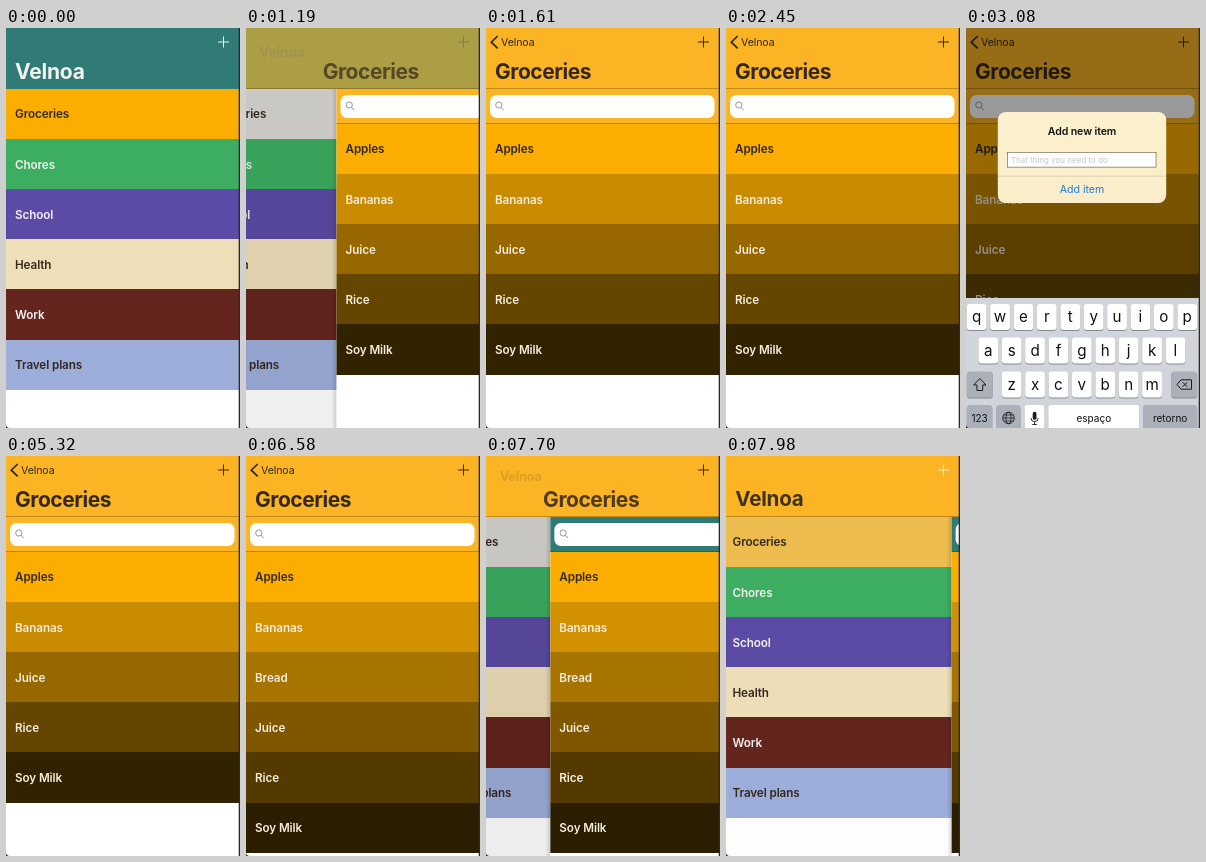
These frames come from a looping animation (234 px wide and 400 px high, 8 s). An HTML page with a canvas:

```html
<!DOCTYPE html>
<html lang="en">
<head>
<meta charset="utf-8">
<title>Velnoa</title>
<style>
html, body { margin: 0; width: 100%; height: 100%; overflow: hidden; background: #fff; }
canvas { display: block; width: 234px; height: 400px; }
</style>
</head>
<body>
<canvas id="stage"></canvas>
<script>
const W = 234, H = 400, LOOP = 8000, ROW = 50.1, BAR = 61;
const APP = 'Velnoa';
const TEAL = [48, 123, 118], GOLD = [250, 180, 36], ORANGE = [251, 174, 0];
const DARK = [52, 40, 28], WHITE = [242, 242, 240], GRAY = [214, 213, 209];
const FONT = 'Inter, "Liberation Sans", sans-serif';
const PUSH = 1050, POP = 7631, ADDED = 5390;
const TYPED = [3360, 3570, 3710, 3850, 4060];

const lists = [
  ['Groceries', ORANGE, DARK],
  ['Chores', [61, 174, 97], WHITE],
  ['School', [91, 75, 166], WHITE],
  ['Health', [238, 223, 185], DARK],
  ['Work', [100, 37, 30], WHITE],
  ['Travel plans', [157, 174, 219], DARK]
];

const canvas = document.getElementById('stage');
const c = canvas.getContext('2d');
const dpr = window.devicePixelRatio || 1;
canvas.width = W * dpr;
canvas.height = H * dpr;

const clamp = v => Math.max(0, Math.min(1, v));
const smooth = v => { v = clamp(v); return v * v * (3 - 2 * v); };
const easeOut = v => 1 - Math.pow(1 - clamp(v), 3);
const lerp = (a, b, k) => a + (b - a) * k;
const mix = (a, b, k) => a.map((v, i) => lerp(v, b[i], k));
const css = (rgb, alpha = 1) => `rgba(${rgb.map(Math.round).join()},${alpha})`;

// Critically damped spring from 0 to 1
function spring(ms) {
  if (ms <= 0) return 0;
  const x = ms * 0.0147, v = 1 - (1 + x) * Math.exp(-x);
  return v > 0.99 ? 1 : v;
}

function rect(x, y, w, h, fill) {
  c.fillStyle = fill;
  c.fillRect(x, y, w, h);
}

function round(x, y, w, h, r, fill) {
  c.fillStyle = fill;
  c.beginPath();
  c.roundRect(x, y, w, h, r);
  c.fill();
}

function text(str, x, y, size, weight, fill, align = 'left', spacing = 0) {
  c.font = `${weight} ${size}px ${FONT}`;
  c.letterSpacing = spacing + 'px';
  c.textAlign = align;
  c.textBaseline = 'alphabetic';
  c.fillStyle = fill;
  c.fillText(str, x, y + size * 0.36);
}

function path(points, color, width = 1, close = false) {
  c.strokeStyle = color;
  c.lineWidth = width;
  c.beginPath();
  points.forEach(([x, y]) => c.lineTo(x, y));
  if (close) c.closePath();
  c.stroke();
}

function ring(x, y, rx, ry, color, width = 1) {
  c.strokeStyle = color;
  c.lineWidth = width;
  c.beginPath();
  c.ellipse(x, y, rx, ry, 0, 0, Math.PI * 2);
  c.stroke();
}

function rows(items, top) {
  items.forEach(([name, fill, ink], i) => {
    const y = Math.round(top + i * ROW);
    const end = Math.round(top + (i + 1) * ROW);
    rect(0, y, W, end - y, css(fill));
    text(name, 9, top + i * ROW + 25.2, 11.7, 600, css(ink), 'left', -0.1);
  });
}

function listPage(gray) {
  rect(0, 0, W, H, '#fff');
  const [first, ...rest] = lists;
  rows([[first[0], mix(ORANGE, GRAY, gray), DARK], ...rest], 61);
}

function itemPage(t, barColor) {
  const names = ['Apples', 'Bananas', 'Juice', 'Rice', 'Soy Milk'];
  if (t >= ADDED) names.splice(2, 0, 'Bread');
  rect(0, 0, W, H, '#fff');
  rect(0, 60, W, 36, css(barColor));
  round(4, 67, 224.5, 23, 6.5, '#fff');
  ring(12.8, 77, 3.1, 3.1, '#8e8e93', 0.9);
  path([[15, 79.3], [17.7, 82.2]], '#8e8e93', 1);
  rect(0, 95, W, 0.7, 'rgba(70,45,0,.5)');
  rows(names.map((name, i) => [
    name,
    ORANGE.map(v => v * (1 - i / names.length)),
    i ? [244, 236, 220] : DARK
  ]), 96);
}

// open: 0 shows the lists, 1 shows the items
function header(open, color, ink, plus) {
  const shut = 1 - open;
  rect(0, 0, W, BAR, css(color));
  if (color !== TEAL) rect(0, 60, W, 0.7, 'rgba(70,45,0,.45)');

  const back = clamp(1 - shut * 4);
  if (back > 0) {
    path([[11.7, 8], [5.3, 14.2], [11.7, 20.4]], css(ink, back), 1.7);
    text(APP, 15, 14.2, 10.6, 400, css(ink, back), 'left', -0.1);
  }
  if (shut > 0) {
    const grow = Math.pow(shut, 1.2);
    text(APP, lerp(15, 9, grow), lerp(14, 43.7, grow), lerp(10.6, 21, grow), 700,
      css(ink, Math.pow(shut, 1.5)), 'left', -0.2);
  }
  if (open > 0) {
    text('Groceries', 9 + shut * 175, 43.5, 21, 700,
      css(DARK, clamp(1.25 - 1.35 * shut)), 'left', -0.45);
  }
  path([[212, 14], [223, 14]], css(plus), 1);
  path([[217.5, 8.5], [217.5, 19.5]], css(plus), 1);
}

function key(x, y, w, label, special) {
  round(x, y + 1, w, 26, 3.2, '#898b90');
  round(x, y, w, 26, 3.2, special ? '#abb0bb' : '#fff');
  if (label) text(label, x + w / 2, y + 13, label.length > 1 ? 10 : 15.2, 400, '#111', 'center');
}

function keyboard(y) {
  const ink = '#1b1b1b';
  c.save();
  c.translate(0, y);
  rect(0, 0, W, 140, '#d1d4da');
  [['qwertyuiop', 0.8, 6], ['asdfghjkl', 12.4, 39.5], ['zxcvbnm', 35.8, 73.5]].forEach(([letters, x, top]) => {
    [...letters].forEach((ch, i) => key(x + i * 23.4, top, 19.7, ch));
  });
  key(0.8, 73.5, 26, '', true);
  key(205.2, 73.5, 26, '', true);
  key(0.8, 107, 25.5, '123', true);
  key(30.5, 107, 24, '', true);
  key(58.5, 107, 20, '');
  key(82.3, 107, 91, 'espaço');
  key(177, 107, 54.2, 'retorno', true);

  path([[13.8, 80.5], [20, 87], [16.7, 87], [16.7, 92.5], [10.9, 92.5], [10.9, 87], [7.6, 87]], ink, 1, true);
  path([[211, 86.5], [215, 81.8], [225.5, 81.8], [225.5, 91.2], [215, 91.2]], ink, 1, true);
  path([[216.7, 84.2], [221.3, 88.8]], ink, 1);
  path([[221.3, 84.2], [216.7, 88.8]], ink, 1);

  ring(42.5, 120, 5.7, 5.7, ink, 0.9);
  ring(42.5, 120, 2.6, 5.7, ink, 0.8);
  path([[36.8, 120], [48.2, 120]], ink, 0.8);
  path([[37.8, 117], [47.2, 117]], ink, 0.7);
  path([[37.8, 123], [47.2, 123]], ink, 0.7);

  round(66.7, 113.8, 3.8, 8, 1.9, ink);
  c.strokeStyle = ink;
  c.lineWidth = 0.9;
  c.beginPath();
  c.arc(68.6, 120, 3.6, 0, Math.PI);
  c.stroke();
  path([[68.6, 123.6], [68.6, 126.5]], ink, 0.9);
  path([[66.3, 126.5], [70.9, 126.5]], ink, 0.9);
  c.restore();
}

function alertBox(t, alpha, scale) {
  c.save();
  c.globalAlpha = alpha;
  c.translate(116, 129.5);
  c.scale(scale, scale);
  c.translate(-116, -129.5);
  const fill = c.createLinearGradient(0, 84, 0, 175);
  fill.addColorStop(0, '#fcf1cd');
  fill.addColorStop(1, '#f9edca');
  round(31.8, 84, 168.4, 91, 8, fill);
  text('Add new item', 116, 102.8, 10.6, 600, '#111', 'center', -0.1);
  rect(41, 124, 149.4, 15.5, '#77684d');
  rect(41.7, 124.7, 148, 14.1, '#fff');
  const count = TYPED.filter(at => t >= at).length;
  if (count) text('Bread'.slice(0, count), 44.8, 131.8, 8, 400, '#111');
  else text('That thing you need to do', 44.8, 131.8, 8, 400, '#c6c6ca');
  rect(31.8, 147.8, 168.4, 0.6, 'rgba(90,75,40,.3)');
  text('Add item', 116, 161, 10.6, 400, '#2378d9', 'center');
  c.restore();
}

function modal(t) {
  const rise = easeOut((t - 2520) / 430), fall = smooth((t - 4920) / 340);
  if (rise <= 0 || fall >= 1) return;
  const shown = smooth((t - 2520) / 330) * (1 - smooth((t - 4920) / 280));
  rect(0, 0, W, H, `rgba(0,0,0,${0.4 * shown})`);
  if (shown > 0) alertBox(t, shown, 1 + 0.15 * (1 - easeOut((t - 2520) / 400)));
  keyboard(270 + 132 * (1 - rise + fall));
}

function draw(t) {
  const popping = t >= POP;
  const open = popping ? 1 - spring(t - POP) : spring(t - PUSH);
  const color = popping ? GOLD : open ? mix(TEAL, GOLD, open) : TEAL;
  const gray = popping ? 1 - smooth((t - 7700) / 480) : smooth((t - 980) / 60);

  c.setTransform(dpr, 0, 0, dpr, 0, 0);
  if (open < 1) {
    c.save();
    c.translate(-70 * (open), 0);
    listPage(gray);
    c.restore();
    rect(0, 0, W, H, `rgba(0,0,0,${0.1 * open})`);
  }
  if (open > 0) {
    const x = W * (1 - open);
    if (x > 0) {
      const shade = c.createLinearGradient(x - 5, 0, x, 0);
      shade.addColorStop(0, 'rgba(0,0,0,0)');
      shade.addColorStop(1, 'rgba(0,0,0,.14)');
      rect(x - 5, 60, 5, H, shade);
    }
    c.save();
    c.translate(x, 0);
    itemPage(t, popping ? TEAL : GOLD);
    c.restore();
  }
  const ink = popping ? DARK : mix(WHITE, DARK, open);
  header(open, color, ink, mix(WHITE, DARK, popping ? smooth(open * 2) : open));
  modal(t);

  // Device edge
  rect(232.7, 0, 1.3, H, '#2a2a2a');
  c.fillStyle = '#333';
  c.beginPath();
  c.moveTo(0, 397);
  c.quadraticCurveTo(0.4, 399.6, 3, 400);
  c.lineTo(0, 400);
  c.fill();
}

const start = performance.now();
function tick() {
  draw((performance.now() - start) % LOOP);
  requestAnimationFrame(tick);
}
tick();
</script>
</body>
</html>
```
